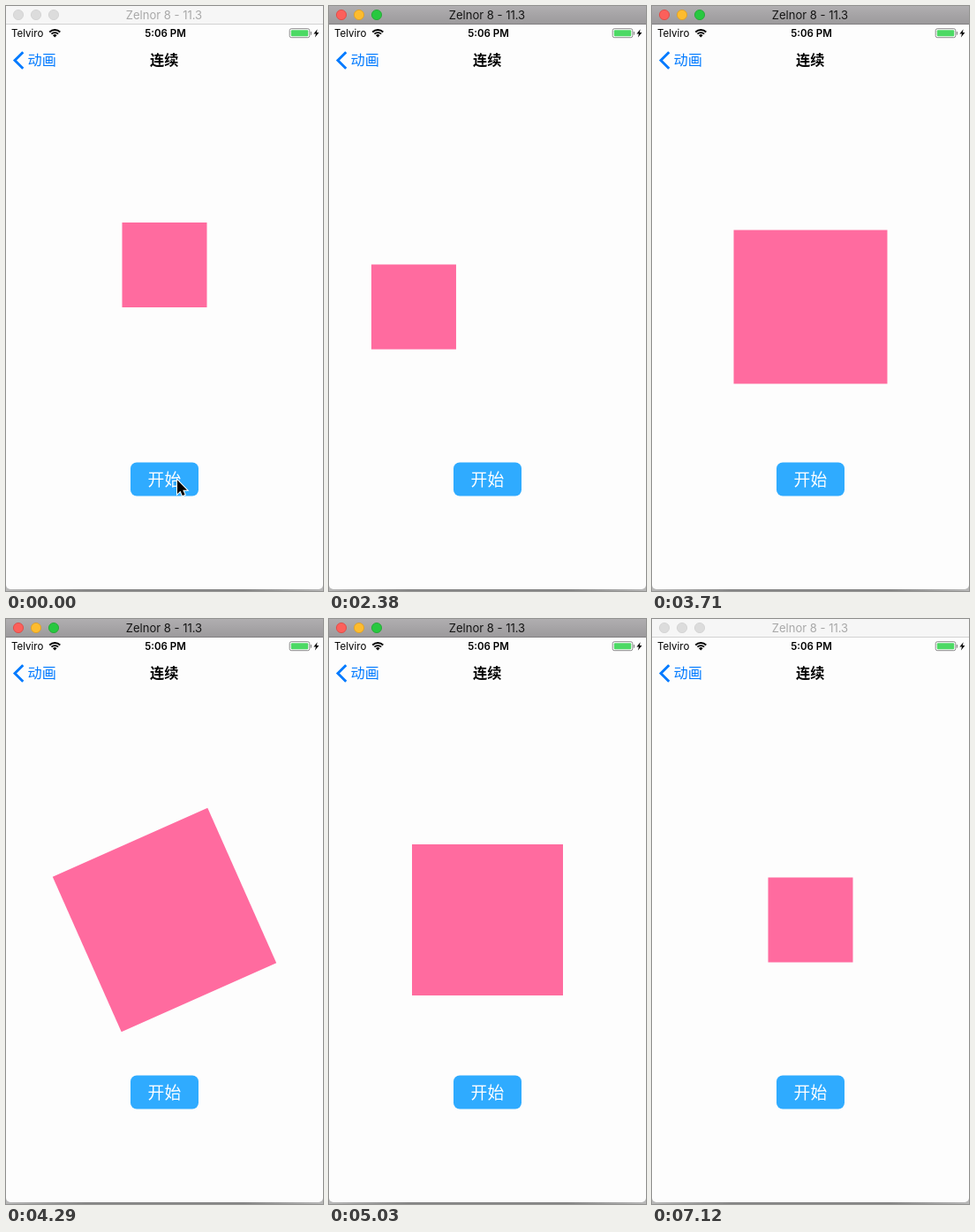
An HTML page with a canvas that plays this animation: 359x662 px, repeating every 7150 ms.

```html
<!DOCTYPE html>
<html lang="zh-CN">
<head>
<meta charset="utf-8">
<title>连续</title>
<style>
  html, body { margin: 0; width: 100%; height: 100%; overflow: hidden; background: #fdfdfd; }
  canvas { display: block; width: 359px; height: 662px; }
</style>
</head>
<body>
<canvas id="stage" lang="zh-CN"></canvas>
<script>
const W = 359, H = 662, LOOP = 7150;
const PRESS = 1780, STEP = 147.5, BLUR = 7120;
const LATIN = 'Inter, "Liberation Sans", sans-serif';
const HAN = '"Noto Sans CJK SC", "Noto Sans CJK", sans-serif';
const SIZE = 96, CX = 179.5, CY = 340.5;

// [step, progress]: 0-1 slide, 1-2 grow, 2-3 turn, 3-4 shrink
const KEYS = [[1, 0], [2, .06], [8, .974], [9, 1.115], [15, 2.161], [17, 2.367], [22, 3.219], [23, 3.36], [28, 4]];

const canvas = document.getElementById('stage');
const g = canvas.getContext('2d');
const dpr = window.devicePixelRatio || 1;
canvas.width = Math.round(W * dpr);
canvas.height = Math.round(H * dpr);

const clamp = v => Math.min(1, Math.max(0, v));

function progress(step) {
  for (let i = 1; i < KEYS.length; i++) {
    const [a, p] = KEYS[i - 1], [b, q] = KEYS[i];
    if (step <= b) return p + (q - p) * clamp((step - a) / (b - a));
  }
  return 4;
}

function text(str, x, y, font, color, align = 'left') {
  g.font = font;
  g.fillStyle = color;
  g.textAlign = align;
  g.fillText(str, x, y);
}

function rounded(x, y, w, h, r) {
  g.beginPath();
  g.moveTo(x + r, y);
  g.arcTo(x + w, y, x + w, y + h, r);
  g.arcTo(x + w, y + h, x, y + h, r);
  g.arcTo(x, y + h, x, y, r);
  g.arcTo(x, y, x + w, y, r);
  g.closePath();
}

function poly(points) {
  g.beginPath();
  points.forEach(([x, y], i) => i ? g.lineTo(x, y) : g.moveTo(x, y));
}

function titleBar(active) {
  const fill = g.createLinearGradient(0, 0, 0, 20);
  fill.addColorStop(0, active ? '#b0aeb0' : '#f6f6f6');
  fill.addColorStop(1, active ? '#9c9a9c' : '#f6f6f6');
  g.fillStyle = fill;
  g.fillRect(0, 0, W, 20);
  g.fillStyle = active ? '#828082' : '#d2d2d2';
  g.fillRect(0, 20, W, 1);
  const dots = active
    ? [['#fc605b', '#e0453f'], ['#fdbc2e', '#dd9d20'], ['#28c840', '#1ea630']]
    : Array(3).fill(['#dcdcdc', '#d0d0d0']);
  dots.forEach(([inner, edge], i) => {
    g.beginPath();
    g.arc(14 + 20 * i, 10, 5.6, 0, 7);
    g.fillStyle = inner;
    g.fill();
    g.strokeStyle = edge;
    g.lineWidth = .8;
    g.stroke();
  });
  text('Zelnor 8 - 11.3', 179, 14.8, '13px ' + LATIN, active ? '#141414' : '#a8a8a8', 'center');
}

function wifi(x, y) {
  const from = -Math.PI * .75, to = -Math.PI * .25;
  g.strokeStyle = '#000';
  g.lineWidth = 1.9;
  for (const r of [5.4, 8.5]) {
    g.beginPath();
    g.arc(x, y, r, from, to);
    g.stroke();
  }
  g.beginPath();
  g.moveTo(x, y);
  g.arc(x, y, 3.2, from, to);
  g.fillStyle = '#000';
  g.fill();
}

function statusBar() {
  text('Telviro', 6, 35.2, '11.5px ' + LATIN, '#000');
  wifi(55.3, 35.5);
  text('5:06 PM', 180.5, 35.2, '600 11.5px ' + LATIN, '#000', 'center');
  rounded(321.2, 25.7, 22.6, 10, 2);
  g.strokeStyle = '#8c8c8c';
  g.lineWidth = 1;
  g.stroke();
  rounded(322.8, 27.2, 19.4, 7, 1);
  g.fillStyle = '#4cd964';
  g.fill();
  g.fillStyle = '#8c8c8c';
  g.fillRect(344.8, 29, 1.3, 3.6);
  poly([[352.6, 26.3], [348.4, 31.4], [351, 31.4], [349.9, 35.4], [354.4, 30], [351.7, 30]]);
  g.fillStyle = '#000';
  g.fill();
}

function navBar() {
  poly([[19.3, 52.2], [10, 61.5], [19.3, 70.8]]);
  g.strokeStyle = '#007aff';
  g.lineWidth = 2.9;
  g.stroke();
  text('动画', 24.6, 67.2, '16.2px ' + HAN, '#007aff');
  text('连续', 179.3, 67.2, 'bold 16.2px ' + HAN, '#000', 'center');
}

function button(pressed) {
  rounded(141, 516.5, 77, 38, 7);
  g.fillStyle = pressed ? '#128ee0' : '#2fabff';
  g.fill();
  text('开始', 179.4, 542.5, '18.8px ' + HAN, '#fff', 'center');
}

function cursor(x, y) {
  poly([[0, 0], [0, 15.5], [3.5, 12.2], [5.8, 17.6], [8.6, 16.4], [6.3, 11.2], [11, 11.2]]
    .map(([dx, dy]) => [x + dx, y + dy]));
  g.closePath();
  g.strokeStyle = '#fff';
  g.lineWidth = 2;
  g.stroke();
  g.fillStyle = '#000';
  g.fill();
}

function square(step) {
  const p = progress(step);
  const x = step < 1 ? CX : SIZE / 2 + (CX - SIZE / 2) * clamp(p);
  const y = step < 1 ? 293 : CY;
  const side = SIZE * (1 + clamp(p - 1) - clamp(p - 3));
  g.save();
  g.translate(x, y);
  g.rotate(Math.PI * clamp(p - 2));
  g.fillStyle = '#ff6b9f';
  g.fillRect(-side / 2, -side / 2, side, side);
  g.restore();
}

function windowEdge() {
  const shade = g.createLinearGradient(0, 0, W, 0);
  shade.addColorStop(0, '#b8b8b8');
  shade.addColorStop(.25, '#858585');
  shade.addColorStop(.75, '#858585');
  shade.addColorStop(1, '#b8b8b8');
  g.fillStyle = shade;
  g.fillRect(0, 640, W, 22);
  rounded(0, 600, W, 60, 5);
  g.fillStyle = '#fdfdfd';
  g.fill();
}

function draw(t) {
  const step = Math.floor((t - PRESS) / STEP);
  g.setTransform(dpr, 0, 0, dpr, 0, 0);
  g.fillStyle = '#fdfdfd';
  g.fillRect(0, 0, W, H);
  windowEdge();
  titleBar(step >= 0 && t < BLUR);
  statusBar();
  navBar();
  square(step);
  button(step === 0);
  if (step < 2) cursor(194, 536.5);
}

function tick() {
  draw(performance.now() % LOOP);
  requestAnimationFrame(tick);
}
tick();
</script>
</body>
</html>
```
